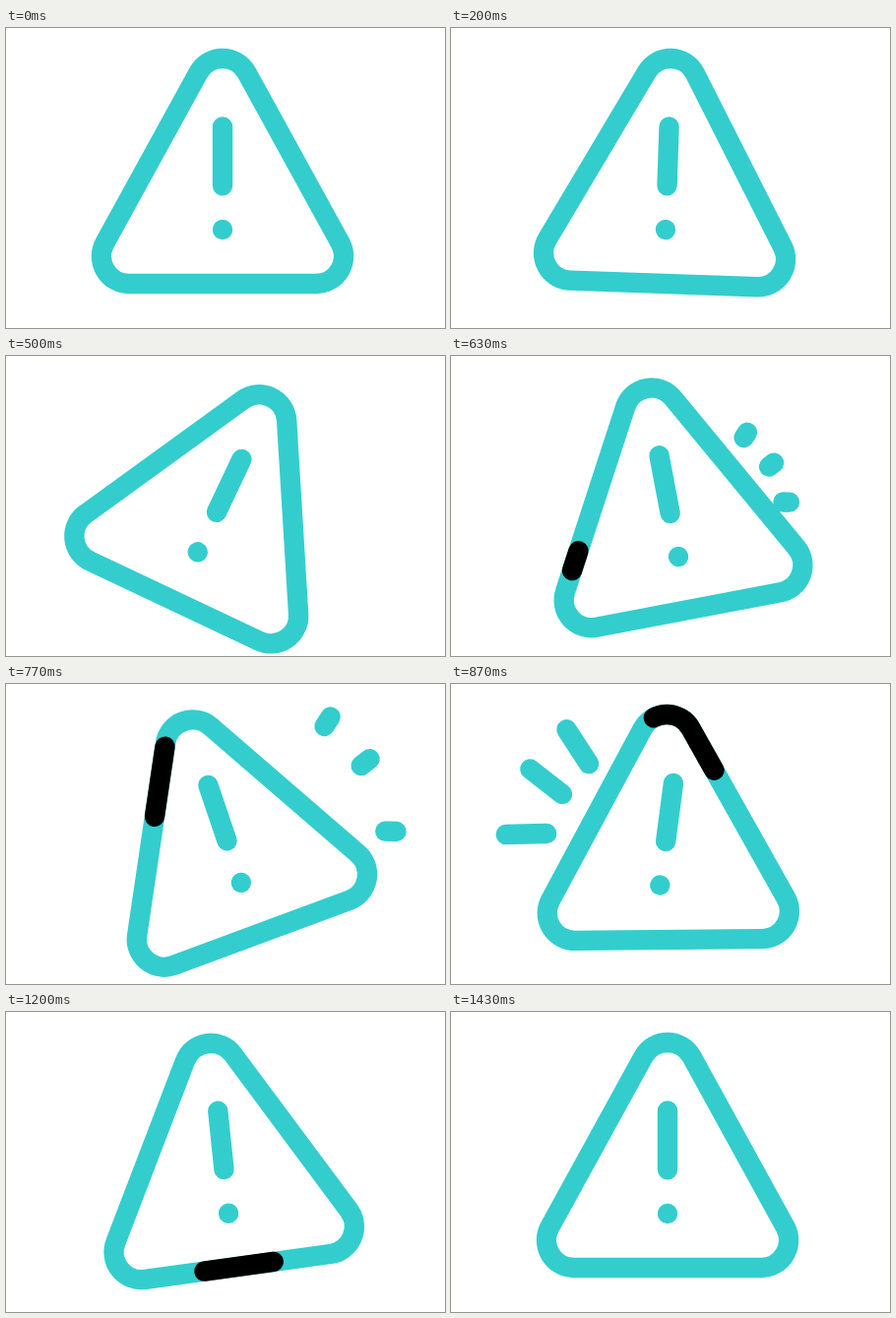
These frames come from a looping animation (446x305 px, 1.67 s). An HTML page:

```html
<!DOCTYPE html>
<html lang="en">
<head>
<meta charset="utf-8">
<title>Warning sign</title>
<style>
  html, body { margin: 0; width: 100%; height: 100%; overflow: hidden; background: #fff; }
  svg { display: block; width: 100vw; height: 100vh; }
  path { fill: none; stroke: #33cdce; stroke-width: 20.4; stroke-linecap: round; stroke-linejoin: round; }
  #runner { stroke: #000; }
</style>
</head>
<body>
<svg viewBox="0 0 446 305">
  <defs>
    <g id="fan">
      <path class="ray" d="M0 0h-59" transform="translate(143.5 86.4) rotate(57)"/>
      <path class="ray" d="M0 0h-59" transform="translate(118 115.9) rotate(38)"/>
      <path class="ray" d="M0 0h-59" transform="translate(103.5 151.9) rotate(-1.4)"/>
    </g>
  </defs>
  <g id="left"></g>
  <g id="right" transform="translate(441 -3.4) scale(-1 1)"></g>
  <g id="sign">
    <path id="edge" d="M100.5 218.4L195.5 45.4A28 28 0 0 1 244.5 45.4L339.5 218.4A28 28 0 0 1 315 260H125A28 28 0 0 1 100.5 218.4Z"/>
    <path id="runner"/>
  </g>
  <path id="mark" d="M220 100.5V160.2M220 205h.01"/>
</svg>
<script>
const LOOP = 1670, FPS = 30;
const $ = id => document.getElementById(id);

const clamp = u => Math.min(1, Math.max(0, u));
const ease = u => (1 - Math.cos(Math.PI * clamp(u))) / 2;
const settle = u => u * (1.15 - 0.15 * u ** 3);

// Wind up, swing back, then a second crest and dip before resting.
function swing(f, crest, high, low) {
  const turns = [[4, 0], [15.1, 25.3], [21.15, -24.8], [crest, high], [37, low], [43, 0]];
  let angle = 0;
  turns.slice(1).forEach(([end, to], i) => {
    const [start, from] = turns[i];
    angle += (to - from) * ease((f - start) / (end - start));
  });
  return angle;
}

const rotate = (el, deg) => el.setAttribute('transform', `rotate(${deg} 220 146)`);

// Shows only the stretch of a path between two fractions of its length.
function trim(el, tail, head) {
  const len = el.getTotalLength();
  el.style.visibility = head > tail ? 'visible' : 'hidden';
  el.style.strokeDasharray = `${Math.max(0.01, (head - tail) * len)} ${len * 2}`;
  el.style.strokeDashoffset = -tail * len;
}

function fan(id) {
  $(id).append(...[...$('fan').children].map(ray => ray.cloneNode()));
  return [...$(id).children];
}

const left = fan('left'), right = fan('right');
const runner = $('runner');
runner.setAttribute('d', $('edge').getAttribute('d'));

function burst(rays, age) {
  rays.forEach(ray => trim(ray, ease((age - 2) / 4), ease(age / 4)));
}

function draw(ms) {
  const f = Math.floor((ms % LOOP + 3.4) * FPS / 1000);
  rotate($('sign'), swing(f, 29.8, 16, -9));
  rotate($('mark'), swing(f, 29.2, 24.3, -7.2));
  burst(right, f - 18.15);
  burst(left, f - 23.15);
  const u = clamp((f - 17.85) / 23.2);
  trim(runner, 1 - settle(1 - u), settle(u));
}

const begin = performance.now();
function tick() {
  draw(performance.now() - begin);
  requestAnimationFrame(tick);
}
tick();
</script>
</body>
</html>
```
